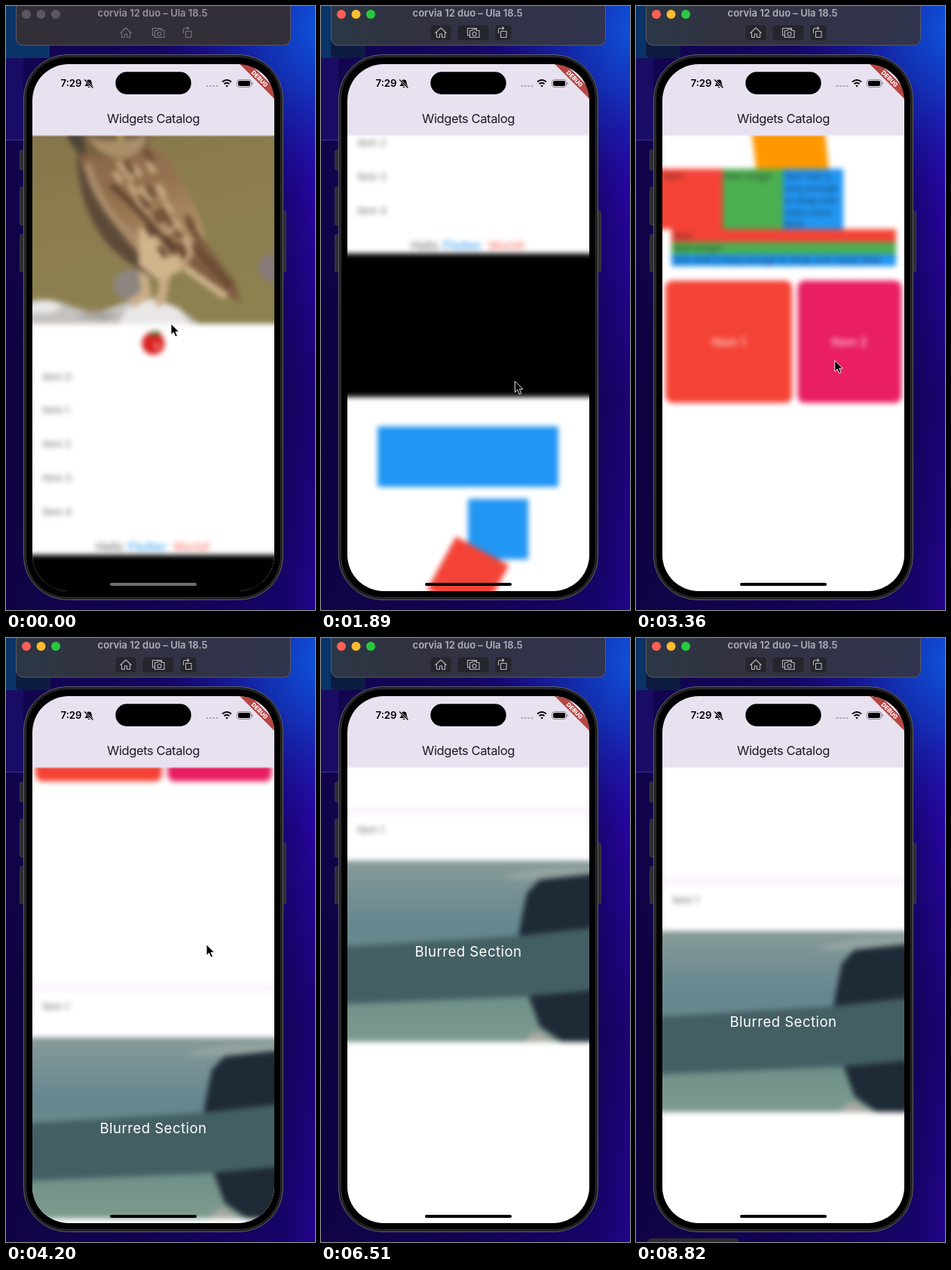
An HTML page for the animation above (8890 ms loop, 410 px wide and 800 px high).

```html
<!DOCTYPE html>
<html lang="en">
<head>
<meta charset="utf-8">
<title>Widgets Catalog</title>
<style>
  html, body { margin: 0; width: 100%; height: 100%; overflow: hidden; background: #12003c; }
  svg { display: block; width: 410px; height: 800px; font-family: Inter, sans-serif; }
  .mid { text-anchor: middle; }
  .line { fill: none; stroke: #b9b7be; stroke-width: 1.1; stroke-linejoin: round; }
  .idle .active { display: none; }
  .idle .line { stroke: #77747d; }
  .idle .light { fill: #5a5761; }
  .idle #bar { fill: #332f39; }
  .idle #caption { fill: #97949c; }
</style>
</head>
<body>
<svg id="stage" viewBox="0 0 410 800">
  <defs>
    <linearGradient id="desk">
      <stop stop-color="#12044e"/><stop offset=".5" stop-color="#150563"/>
      <stop offset=".9" stop-color="#1c0582"/><stop offset="1" stop-color="#2c06b4"/>
    </linearGradient>
    <linearGradient id="dusk" x2="0" y2="1">
      <stop stop-color="#0b0030" stop-opacity="0"/><stop offset=".3" stop-color="#0b0030" stop-opacity=".15"/>
      <stop offset=".65" stop-color="#0b0030" stop-opacity=".5"/><stop offset="1" stop-color="#0b0030" stop-opacity=".3"/>
    </linearGradient>
    <radialGradient id="glow" gradientUnits="userSpaceOnUse" cx="430" cy="30" r="230">
      <stop stop-color="#0c5ae0"/><stop offset=".4" stop-color="#0f3cc0" stop-opacity=".75"/>
      <stop offset="1" stop-color="#1a10a0" stop-opacity="0"/>
    </radialGradient>
    <linearGradient id="glass">
      <stop stop-color="#2b3745"/><stop offset=".3" stop-color="#323240"/><stop offset="1" stop-color="#30344e"/>
    </linearGradient>
    <linearGradient id="field" x2=".3" y2="1">
      <stop stop-color="#7e6f47"/><stop offset=".5" stop-color="#8b7c4e"/><stop offset="1" stop-color="#8c814f"/>
    </linearGradient>
    <linearGradient id="plumage" x2=".6" y2="1">
      <stop stop-color="#866445"/><stop offset=".5" stop-color="#957150"/><stop offset="1" stop-color="#b9986f"/>
    </linearGradient>
    <linearGradient id="sea" x2="0" y2="1">
      <stop stop-color="#879a98"/><stop offset=".35" stop-color="#668690"/>
      <stop offset=".7" stop-color="#6c8d88"/><stop offset="1" stop-color="#7d9b8e"/>
    </linearGradient>
    <filter id="soft" filterUnits="userSpaceOnUse" x="0" y="150" width="410" height="2200" color-interpolation-filters="sRGB">
      <feGaussianBlur stdDeviation="3.6"/>
    </filter>
    <clipPath id="screen"><rect x="35" y="77" width="321" height="698" rx="48"/></clipPath>
    <clipPath id="view"><rect x="35" y="171" width="321" height="604"/></clipPath>
    <clipPath id="owlFrame"><rect x="25" y="182" width="341" height="320"/></clipPath>
    <path id="torso" d="M94 265Q180 248 212 282 246 322 264 385L238 428 205 446Q170 430 140 402 92 350 94 265z"/>
    <clipPath id="owlBody"><use href="#torso"/></clipPath>
  </defs>

  <!-- desktop -->
  <rect width="410" height="800" fill="url(#desk)"/>
  <rect width="410" height="800" fill="url(#dusk)"/>
  <rect width="410" height="300" fill="url(#glow)"/>
  <rect y="69" width="23" height="108" fill="#190c64"/>
  <rect width="58" height="69" fill="#0a3468"/>
  <rect class="active" x="13" y="20" width="46" height="49" rx="6" fill="#0d1d42"/>
  <path d="M0 177.5H23" stroke="#40309a"/>
  <rect id="tray" x="14" y="795" width="124" height="20" rx="8" fill="#2c2b33"/>

  <!-- simulator title bar -->
  <rect id="bar" x="13.500" y="-14" width="364" height="66" rx="9" fill="url(#glass)" stroke="#5b5a66"/>
  <circle class="light" cx="27" cy="11" r="6" fill="#ff5f57"/>
  <circle class="light" cx="46.500" cy="11" r="6" fill="#febc2e"/>
  <circle class="light" cx="66" cy="11" r="6" fill="#28c840"/>
  <text id="caption" class="mid" x="194.500" y="14" font-size="13" font-weight="600" fill="#b2b0b8">corvia 12 duo – Ula 18.5</text>
  <g class="active" fill="#25252d" stroke="#3a3a43" stroke-width=".6">
    <rect x="145" y="25" width="28" height="21" rx="4"/>
    <rect x="181" y="25" width="42" height="21" rx="4"/>
    <rect x="231" y="25" width="22" height="21" rx="4"/>
  </g>
  <path class="line" d="M151.500 36l7.500-7 7.500 7M153.500 35v6.500h4V37h3v4.500h4V35
    M197.500 39h-3V29.500h12v2.500M197.500 32.500h3l1-1.500h4l1 1.500h3.500v9h-12.500z
    M238.500 33.500h7.500v8h-7.500zM235.500 36v-4.500q0-2 2-2h5M240.500 27.500l2.200 2-2.200 2"/>
  <circle class="line" cx="203.500" cy="37" r="2.500"/>

  <!-- phone body -->
  <g fill="#2c2c32" stroke="#48484d" stroke-width=".7">
    <rect x="18.500" y="191" width="6" height="26" rx="1.500"/>
    <rect x="18.500" y="240" width="6" height="50" rx="1.500"/>
    <rect x="18.500" y="303" width="6" height="49" rx="1.500"/>
    <rect x="366" y="272" width="5.500" height="80" rx="1.500"/>
  </g>
  <rect x="23.500" y="64.500" width="344" height="722" rx="58" fill="#202022" stroke="#606064"/>
  <rect x="26.500" y="67.500" width="338" height="716" rx="55" fill="#000" stroke="#303033"/>

  <g clip-path="url(#screen)">
    <rect x="35" y="171" width="321" height="604" fill="#fff"/>
    <g clip-path="url(#view)">
      <g id="page">
        <g filter="url(#soft)">
          <!-- picture, list and rich text -->
          <rect x="25" y="160" width="341" height="22" fill="#fbf5fd"/>
          <g clip-path="url(#owlFrame)">
            <rect x="25" y="182" width="341" height="320" fill="url(#field)"/>
            <ellipse cx="164" cy="450" rx="22" ry="20" fill="#8c8580"/>
            <ellipse cx="350" cy="428" rx="15" ry="18" fill="#87797a"/>
            <path d="M25 474Q55 464 84 478L118 488 160 473 196 469 228 480 256 502H25z" fill="#c4c1bf"/>
            <path d="M160 482l36-15 34 16 14 19H150zM25 478q26-14 50 0l-14 10H25z" fill="#e9e7e6"/>
            <path d="M90 492l30-8 30 6-20 8z" fill="#a7a39d"/>
            <path d="M182 430l4 32-20 13M212 432l-6 38-8 4" fill="none" stroke="#c9ac86" stroke-width="13"/>
            <path d="M226 402L258 386 304 446 312 474 286 460 250 434z" fill="#7d5c40"/>
            <path d="M238 428L292 466" stroke="#cfb48f" stroke-width="9"/>
            <path d="M254 404l44 48" stroke="#64462f" stroke-width="7"/>
            <use href="#torso" fill="url(#plumage)"/>
            <g clip-path="url(#owlBody)">
              <path d="M94 262Q106 338 190 424L205 446 130 410 84 330z" fill="#5c4a38"/>
              <path d="M108 290q14 60 78 116" fill="none" stroke="#a88b69" stroke-width="11"/>
              <path d="M176 376q20-8 50 22l10 34-30 16-30-24z" fill="#cfb48c"/>
              <g id="flecks" stroke-width="8" stroke-linecap="round"></g>
              <path d="M140 318q50 44 84 92" fill="none" stroke="#5f432e" stroke-width="8"/>
            </g>
            <path d="M80 238Q80 196 130 194 182 194 195 220 196 254 184 274 140 288 98 276 80 262 80 238z" fill="#79603f"/>
            <path d="M80 240q4-34 34-40-16 36-8 80-26-12-26-40z" fill="#4d4437"/>
            <path d="M122 206q30-12 58 4" fill="none" stroke="#957650" stroke-width="8"/>
            <path d="M108 254q24 8 42 4 22 2 36-8 0 28-30 32-30 2-48-28z" fill="#a98f69"/>
            <path d="M112 226q20-6 36 20 10-20 34-19" fill="none" stroke="#bda683" stroke-width="6"/>
            <circle cx="126" cy="237" r="8" fill="#3a3325"/><circle cx="176" cy="240" r="7" fill="#443a25"/>
            <path d="M120 243h13M171 245h10" stroke="#b49a42" stroke-width="4"/>
            <path d="M147 247h10l-5 16z" fill="#c5ad58"/>
          </g>
          <circle cx="195.500" cy="528" r="15" fill="#d8201f"/>
          <circle cx="200" cy="531" r="5" fill="#ee6a62"/>
          <path d="M188 514l8 5 11-4-7-4z" fill="#5c6a2b"/>
          <g id="items" font-size="13" fill="#1d1b20" fill-opacity=".65"></g>
          <g font-size="15.500" opacity=".7">
            <text x="119" y="803" fill="#1d1b20">Hello</text>
            <text x="162" y="803" font-size="16" font-weight="700" fill="#2196f3">Flutter</text>
            <text x="222" y="803" font-weight="500" fill="#f44336">World!</text>
          </g>
          <rect x="25" y="808" width="341" height="190" fill="#000"/>

          <!-- boxes and cards -->
          <g transform="translate(0 900)">
            <path d="M75 137h240v80H75zM195 233h80v80h-80z" fill="#2196f3"/>
            <rect x="-40" y="-40" width="80" height="80" transform="translate(195 337) rotate(28.650)" fill="#f44336"/>
            <path d="M147 376L248 396 256 474H160z" fill="#ff9800"/>
            <path d="M25 472h90v80H25zM47 552h298v17H47z" fill="#f44336"/>
            <path d="M115 472h80v80h-80zM47 569h298v16H47z" fill="#4caf50"/>
            <path d="M195 472h80v80h-80zM47 585h298v16H47z" fill="#2196f3"/>
            <g font-size="12" fill="#1d1b20" fill-opacity=".7">
              <text x="37" y="486">Item</text><text x="117" y="486">Item longer</text>
              <text x="197" y="486">Item that is</text><text x="197" y="502">long enough</text>
              <text x="197" y="518">to wrap over</text><text x="197" y="534">many short</text>
              <text x="197" y="549">lines</text>
              <text x="50" y="565">Item</text><text x="50" y="581">Item longer</text>
              <text x="50" y="597">Item that is long enough to wrap over many lines</text>
            </g>
            <rect x="39" y="620" width="168" height="162" rx="9" fill="#f44336"/>
            <rect x="214.500" y="620" width="138" height="162" rx="9" fill="#e91e63"/>
            <g class="mid" font-size="16" font-weight="500" fill="#fff" fill-opacity=".8">
              <text x="123" y="707">Item 1</text><text x="283" y="707">Item 2</text>
            </g>
          </g>

          <!-- sheet and backdrop -->
          <g transform="translate(0 1492)">
            <rect x="25" y="458" width="341" height="22" fill="#faf4fc"/>
            <rect x="35" y="468" width="321" height="61" rx="9" fill="#fff"/>
            <text x="48" y="493" font-size="13" fill="#1d1b20" fill-opacity=".65">Item 1</text>
            <rect x="25" y="529" width="341" height="240" fill="url(#sea)"/>
            <path d="M240 552q40-18 126-14v16H250z" fill="#93a3a1"/>
            <path d="M262 628L273 572 290 554 366 546V769H320L290 748 274 704z" fill="#1e2a36"/>
            <path d="M25 643L270 628 366 617V700L270 709 25 719z" fill="#445f64"/>
            <path d="M270 769q10-16 22-13l18 13z" fill="#aaa9a2"/>
          </g>
        </g>
        <text class="mid" x="195.500" y="2148" font-size="18.500" letter-spacing=".5" fill="#fff">Blurred Section</text>
      </g>
    </g>

    <!-- app bar and status -->
    <rect x="35" y="77" width="321" height="94" fill="#e8e1f0"/>
    <rect x="35" y="171" width="321" height="1.500" fill="#efe7f4" opacity=".6"/>
    <text class="mid" x="195.500" y="155" font-size="16.500" letter-spacing="-.4" fill="#1d1b20">Widgets Catalog</text>
    <text x="72.500" y="107" font-size="13.200" font-weight="600" fill="#000">7:29</text>
    <path d="M104.500 106q2-2 2-5 0-3.500 3.500-3.500t3.500 3.500q0 3 2 5zM108.500 107h3q-1.500 2.500-3 0z"/>
    <path d="M104 97.500l11.500 11" stroke="#e8e1f0" stroke-width="2.600"/>
    <path d="M104 97.500l11.500 11" stroke="#000" stroke-width="1.200"/>
    <rect x="145.300" y="87.300" width="100.400" height="29.600" rx="14.800"/>
    <path d="M265.500 106h16" stroke="#aaa5b1" stroke-width="2.200" stroke-dasharray="2.500 1.900"/>
    <path d="M287 100.500q6-5 12 0M289.500 103.300q3.500-3 7 0" fill="none" stroke="#000" stroke-width="1.900"/>
    <path d="M291.300 105.600q1.700-1.500 3.400 0L293 107.500z"/>
    <rect x="306.500" y="97.500" width="19" height="10" rx="3.300" fill="none" stroke="#8d8892"/>
    <rect x="308" y="99" width="16" height="7" rx="2"/>
    <path d="M327 101v3" stroke="#8d8892" stroke-width="1.300"/>
    <g transform="translate(356 77) rotate(45)">
      <rect x="-40" y="22.400" width="80" height="10" fill="#b64644"/>
      <text class="mid" y="30.200" font-size="7.800" font-weight="800" fill="#fff">DEBUG</text>
    </g>
    <rect id="home" x="138" y="764" width="115" height="4" rx="2"/>
  </g>
  <path id="cursor" d="M0 0V14.500l3.400-3.200 2.500 5.700 2.500-1.100-2.400-5.500h4.600z" fill="#000" stroke="#fff" stroke-width=".9"/>
</svg>
<script>
  const LOOP = 8890;
  const $ = id => document.getElementById(id);

  // time, scroll offset, pointer x, pointer y
  const poses = [
    [0, 81, 219, 421], [1050, 0, 252, 473], [2660, 900, 262, 518], [4200, 1492, 266, 406],
    [5740, 1672, 269, 455], [6510, 1726, 269, 455], [6930, 1726, 269, 455], [8820, 1633, 269, 455]
  ];

  $('items').innerHTML = [0, 1, 2, 3, 4]
    .map(i => `<text x="48" y="${576.5 + i * 44.8}">Item ${i}</text>`).join('');

  // Mottled feathers run along the slope of the wing.
  let seed = 7;
  const random = () => (seed = seed * 16807 % 2147483647) / 2147483647;
  $('flecks').innerHTML = Array.from({ length: 44 }, (_, i) => {
    const along = random() * 130, across = random() * 64;
    const x = 128 + along * .62 + across, y = 284 + along - across * .15;
    return `<path d="M${x} ${y}l6 9" stroke="${i % 2 ? '#c3a680' : '#6b4b33'}"/>`;
  }).join('');

  function poseAt(time) {
    const next = poses.findIndex(pose => pose[0] > time);
    if (next < 0) return poses[poses.length - 1];
    const a = poses[next - 1], b = poses[next];
    const u = (time - a[0]) / (b[0] - a[0]);
    const eased = u * u * (3 - 2 * u);
    return a.map((value, i) => value + (b[i] - value) * eased);
  }

  function draw(now) {
    const time = now % LOOP;
    const [, scroll, x, y] = poseAt(time);
    const overBlack = scroll > 42 && scroll < 232;
    $('page').setAttribute('transform', `translate(0 ${-scroll})`);
    $('cursor').setAttribute('transform', `translate(${x} ${y})`);
    $('cursor').style.display = time < 6300 ? '' : 'none';
    $('home').setAttribute('fill', overBlack ? '#6e6e6e' : '#000');
    $('tray').style.display = time >= 8750 ? '' : 'none';
    $('stage').classList.toggle('idle', time < 140);
    requestAnimationFrame(() => draw(performance.now()));
  }
  draw(performance.now());
</script>
</body>
</html>
```
